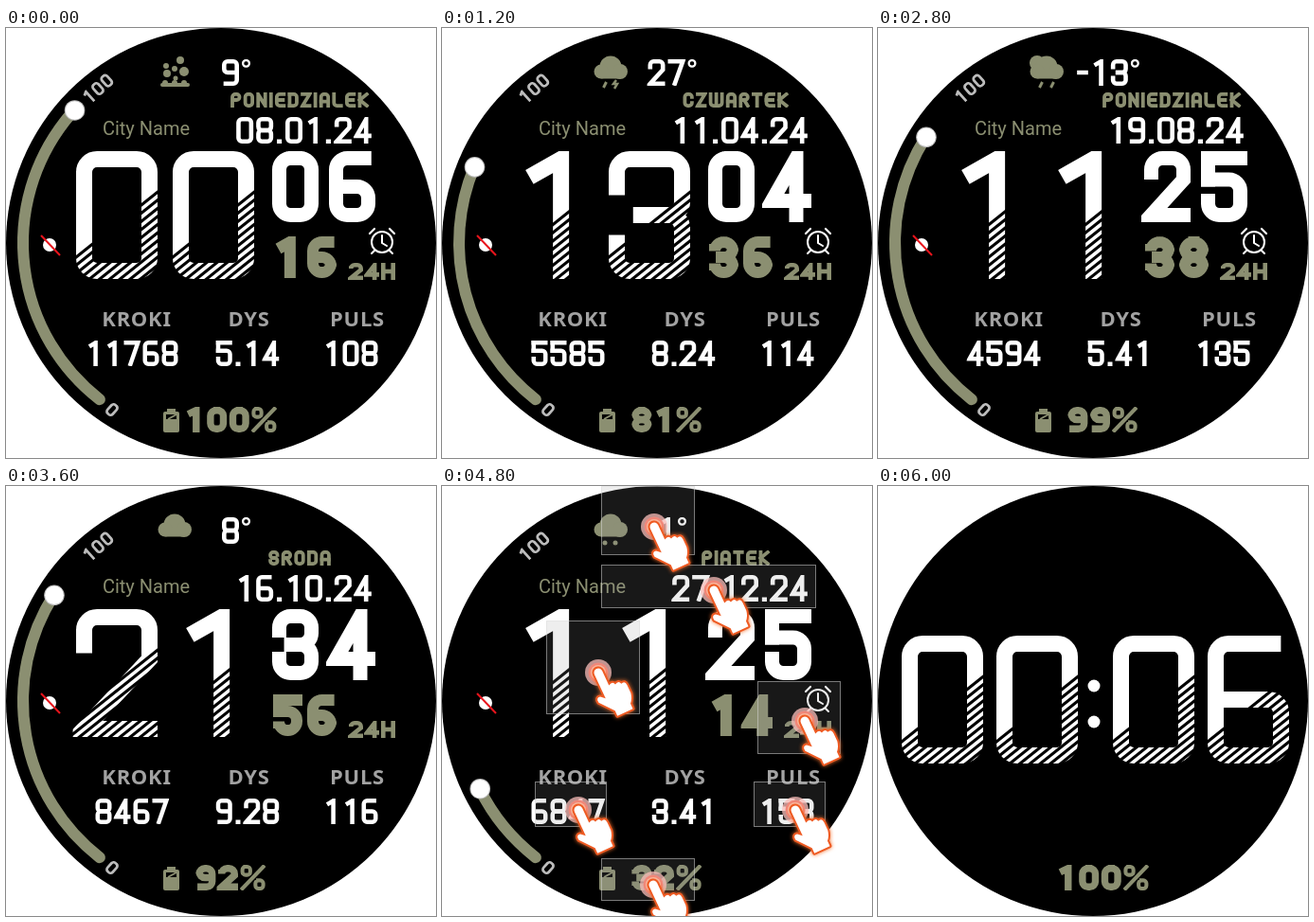
Recreate the animation shown at these times as an HTML page with a canvas. Size 454 by 454 pixels, loop 6400 ms.

```html
<!DOCTYPE html>
<html lang="pl">
<head>
<meta charset="utf-8">
<title>Watch face</title>
<style>
html, body { margin: 0; width: 100%; height: 100%; overflow: hidden; background: #fff; }
canvas { display: block; width: 454px; height: 454px; }
</style>
</head>
<body>
<canvas id="face" width="454" height="454"></canvas>
<script>
const ctx = document.getElementById('face').getContext('2d');
const OLIVE = '#8b8f71', WHITE = '#fff', GREY = '#a2a2a2';
const rad = deg => deg * Math.PI / 180;

// One month per row
const FIELDS = 'hour min sec date day temp sky steps dist pulse power alarm'.split(' ');
const MONTHS = `
00 06 16 08.01 PONIEDZIALEK 9 dust 11768 5.14 108 100 1
07 14 27 13.02 WTOREK 12 rain 8326 6.25 112 72 1
19 52 45 20.03 SRODA 18 cloud 7410 4.86 126 65 0
13 04 36 11.04 CZWARTEK 27 storm 5585 8.24 114 81 1
18 47 21 24.05 PIATEK 23 rain 10342 7.52 121 76 0
00 34 14 22.06 SOBOTA -11 moon 9725 9.41 137 24 1
09 58 52 14.07 NIEDZIELA 25 storm 6238 3.95 118 63 0
11 25 38 19.08 PONIEDZIALEK -13 shower 4594 5.41 135 99 1
16 43 20 17.09 WTOREK 16 rain 7851 6.73 124 95 1
21 34 56 16.10 SRODA 8 cloud 8467 9.28 116 92 0
04 11 07 21.11 CZWARTEK -2 snow 12982 12.33 113 33 0
11 25 14 27.12 PIATEK 1 hail 6847 3.41 153 32 1
`.trim().split('\n').map(row =>
  Object.fromEntries(row.split(' ').map((v, i) => [FIELDS[i], v])));

// Stroke typeface on an 8 x 8 grid: "xy" points, commas part the strokes
const GLYPHS = {
  0: '40 80 88 08 00 40',
  1: '21 50 58',
  2: '02 00 80 83 08 88',
  3: '02 00 80 84 34,34 84 88 08 06',
  4: '68 60 06 86',
  5: '80 00,00 03,03 83 88 08 06',
  6: '70 00 08 88 84 04',
  7: '00 80 38',
  8: '40 80 84 04 00 40,44 84 88 08 04 44',
  9: '18 88 80 00 04 84',
  '.': '38 58', '-': '04 84',
  '°': '40 80 82 02 00 40',
  '%': '10 30 33 03 00 10,80 08,65 85 88 58 55 65',
  A: '08 00 80 88,05 85', B: '40 80 84 04 00 40,44 84 88 08 04 44',
  C: '82 80 00 08 88 86', D: '00 80 88 08,00 08', E: '80 00 08 88,04 74',
  H: '00 08,80 88,04 84', I: '40 48', K: '00 08,80 04 88', L: '00 08 88',
  N: '08 00 88 80', O: '40 80 88 08 00 40', P: '08 00 80 84 04',
  R: '08 00 80 84 04,44 88', S: '82 80 00 04 84 88 08 06',
  T: '00 80,40 48', W: '00 08 88 80,40 48', Z: '00 80 08 88'
};
const WIDTH = { '.': .38, '-': .65, '°': .5, '%': 1.24, I: .33, W: 1.4 };
const WEIGHT = { '%': .55, '°': .5 };

const HOUR = { w: 86, h: 135, t: 17, gap: 16 };
const MINUTE = { w: 49, h: 75, t: 15, gap: 11 };
const SECOND = { w: 31, h: 44, t: 12, gap: 5 };
const DATE = { w: 18, h: 28, t: 4.6, gap: 3 };
const VALUE = { w: 17, h: 27, t: 4.5, gap: 3 };
const POWER = { w: 21, h: 27, t: 7.4, gap: 2.6 };
const DAY = { w: 11.3, h: 16, t: 3.8, gap: 2.3 };
const MODE = { w: 15, h: 18, t: 4.6, gap: 2 };
const SCALE = { w: 10, h: 15, t: 2.8, gap: 2.5 };

const charWidth = (c, font) => font.w * (WIDTH[c] || 1);

function glyph(c, x, y, font, color) {
  const w = charWidth(c, font), t = font.t * (WEIGHT[c] || 1);
  const r = Math.max(3, t * .8), pad = t * .2;
  ctx.save();
  ctx.beginPath();
  ctx.rect(x - pad, y, w + 2 * pad, font.h);
  ctx.clip();
  ctx.strokeStyle = color;
  ctx.lineWidth = t;
  ctx.lineCap = 'square';
  ctx.lineJoin = 'miter';
  for (const stroke of GLYPHS[c].split(',')) {
    const p = stroke.split(' ').map(([gx, gy]) =>
      [x + t / 2 + gx / 8 * (w - t), y + t / 2 + gy / 8 * (font.h - t)]);
    ctx.beginPath();
    ctx.moveTo(...p[0]);
    for (let i = 1; i < p.length; i++) {
      const [a, b, n] = [p[i - 1], p[i], p[i + 1]];
      const square = n && Math.abs((b[0] - a[0]) * (n[0] - b[0]) + (b[1] - a[1]) * (n[1] - b[1])) < .01;
      if (square) ctx.arcTo(...b, ...n, r);
      else ctx.lineTo(...b);
    }
    ctx.stroke();
  }
  ctx.restore();
}

function write(str, x, y, font, color) {
  for (const c of str) {
    glyph(c, x, y, font, color);
    x += charWidth(c, font) + font.gap;
  }
}

function writeMid(str, mid, y, font, color) {
  const total = [...str].reduce((sum, c) => sum + charWidth(c, font) + font.gap, -font.gap);
  write(str, mid - total / 2, y, font, color);
}

// Large digit whose lower right part is hatched
function hatched(c, x, y) {
  glyph(c, x, y, HOUR, WHITE);
  ctx.save();
  ctx.beginPath();
  ctx.rect(x - 5, y, HOUR.w + 10, HOUR.h + 1);
  ctx.clip();
  for (let d = 112; d < 220; d += 8.6)
    line('#000', 3.1, [x - 10, y + d + 8], [x + 96, y + d - 76.8]);
  ctx.restore();
}

function line(color, width, ...pts) {
  ctx.strokeStyle = color;
  ctx.lineWidth = width;
  ctx.beginPath();
  pts.forEach(p => ctx.lineTo(...p));
  ctx.stroke();
}

function disc(x, y, r, color = OLIVE) {
  ctx.fillStyle = color;
  ctx.beginPath();
  ctx.arc(x, y, r, 0, 7);
  ctx.fill();
}

function box(x, y, w, h, color, r = 0) {
  ctx.fillStyle = color;
  ctx.beginPath();
  ctx.roundRect(x, y, w, h, r);
  ctx.fill();
}

function label(str, x, y, color, font, spacing = '0px') {
  ctx.font = font;
  ctx.letterSpacing = spacing;
  ctx.textAlign = 'center';
  ctx.fillStyle = color;
  ctx.fillText(str, x, y);
}

function cloud() {
  disc(178, 41, 11.5);
  disc(168, 46, 7.5);
  disc(188, 46, 8);
  box(166, 44, 24, 9.5, OLIVE, 3);
}

function crescent(x, y, r) {
  disc(x, y, r);
  disc(x + r * .55, y - r * .4, r * .88, '#000');
}

function drops(...xs) {
  xs.forEach(x => line(OLIVE, 3, [x + 1.5, 57], [x - 1.5, 63]));
}

const SKY = {
  dust() {
    [[184, 34, 4], [169, 40, 3], [178, 43, 3], [188, 46, 5], [170, 48, 4], [179, 53, 2.5]]
      .forEach(d => disc(...d));
    box(163, 58, 31, 4, OLIVE, 2);
    [168, 178, 188].forEach(x => disc(x, 58, 3));
  },
  cloud,
  rain() { cloud(); drops(170, 178, 186); },
  storm() {
    cloud();
    drops(172);
    line(OLIVE, 2.5, [184, 55], [181, 59], [185, 59], [182, 64]);
  },
  moon() { crescent(176, 47, 14.5); },
  shower() {
    disc(168, 37, 8);
    disc(180, 42, 12.5, '#000');
    cloud();
    drops(172, 184);
  },
  snow() {
    cloud();
    for (let a = 0; a < 180; a += 60) {
      const dx = 4.5 * Math.sin(rad(a)), dy = 4.5 * Math.cos(rad(a));
      line(OLIVE, 2, [178 - dx, 61 - dy], [178 + dx, 61 + dy]);
    }
  },
  hail() { cloud(); disc(172, 60, 2.5); disc(183, 60, 2.5); }
};

function gauge(power) {
  const at = -55.8 + 9.8 * Math.floor(power / 10);
  ctx.strokeStyle = OLIVE;
  ctx.lineWidth = 12;
  ctx.lineCap = 'round';
  ctx.beginPath();
  ctx.arc(227, 227, 209, rad(180 - 52.2), rad(180 + at));
  ctx.stroke();
  ctx.lineCap = 'butt';
  const x = 227 - 208.5 * Math.cos(rad(at)), y = 227 - 208.5 * Math.sin(rad(at));
  disc(x, y, 10.8, '#bbb');
  disc(x, y, 9.8, WHITE);
  tilted('100', 97, 64, -42);
  tilted('0', 112, 403, 42);
}

function tilted(str, x, y, deg) {
  ctx.save();
  ctx.translate(x, y);
  ctx.rotate(rad(deg));
  writeMid(str, 0, -SCALE.h / 2, SCALE, '#bcbcbc');
  ctx.restore();
}

function alarm() {
  ctx.strokeStyle = WHITE;
  ctx.lineWidth = 2;
  ctx.beginPath();
  ctx.arc(397, 226, 11, 0, 7);
  ctx.stroke();
  ctx.lineCap = 'round';
  line(WHITE, 2, [397, 219], [397, 227], [402, 230]);
  for (const s of [-1, 1]) {
    line(WHITE, 2.2, [397 + s * 8, 212], [397 + s * 13, 217]);
    line(WHITE, 2, [397 + s * 8, 235], [397 + s * 11, 238]);
  }
  ctx.lineCap = 'butt';
}

function battery() {
  box(170, 402, 9, 4, OLIVE);
  box(166, 405, 17, 22, OLIVE, 2);
  box(169, 408, 11, 5, '#000');
  line(OLIVE, 2, [171, 413], [180, 408]);
}

function watch(m) {
  hatched(m.hour[0], 74, 130);
  hatched(m.hour[1], 176, 130);
  gauge(+m.power);
  SKY[m.sky]();
  writeMid(m.temp + '°', 243, 33, DATE, WHITE);
  writeMid(m.day, 310, 68, DAY, OLIVE);
  writeMid(m.date + '.24', 314.5, 94, DATE, WHITE);
  label('City Name', 148, 113, OLIVE, '20px Roboto, sans-serif');
  write(m.min, 281, 130, MINUTE, WHITE);
  write(m.sec, 282, 220, SECOND, OLIVE);
  write('24H', 362, 248, MODE, OLIVE);
  if (m.alarm === '1') alarm();
  disc(46, 229, 7, WHITE);
  line('#e8141c', 2, [37, 219], [57, 240]);
  [['KROKI', 138, m.steps, 133], ['DYS', 256.5, m.dist, 255], ['PULS', 371, m.pulse, 364]]
    .forEach(([name, x, value, mid]) => {
      label(name, x, 315, GREY, '700 22px "Noto Sans", sans-serif', '0.7px');
      writeMid(value, mid, 330, VALUE, WHITE);
    });
  battery();
  writeMid(m.power + '%', 237, 400, POWER, OLIVE);
}

function ambient(time, power) {
  [25, 125, 248, 348].forEach((x, i) => hatched(time[i], x, 158));
  disc(228, 211, 6.5, WHITE);
  disc(228, 249, 6.5, WHITE);
  writeMid(power + '%', 237, 400, POWER, OLIVE);
}

// Tap zone: x, y, width, height, then the fingertip
const ZONES = [
  [168, 0, 99, 73, 224, 43], [168, 83, 227, 46, 287, 110], [110, 142, 99, 99, 165, 197],
  [333, 206, 88, 77, 383, 248], [98, 312, 76, 48, 144, 342], [329, 312, 76, 48, 373, 342],
  [168, 393, 99, 45, 223, 421]
];
const HAND = new Path2D('M-4.5 0A4.5 4.5 0 0 1 4.5 0V17Q10 14 11 19Q16 16 17 21Q22 19 22 25V34Q21 40 17 44V50H-1V44L-13 29Q-14 23 -9 24L-4.5 28Z');

function zone([x, y, w, h]) {
  box(x, y, w, h, 'rgba(150,150,150,.16)');
  ctx.strokeStyle = '#ddd';
  ctx.lineWidth = 1;
  ctx.setLineDash([1, 1]);
  ctx.strokeRect(x + .5, y + .5, w - 1, h - 1);
  ctx.setLineDash([]);
}

function tap(x, y) {
  disc(x, y, 14, 'rgba(250,190,185,.75)');
  disc(x, y, 10.5, '#f08a80');
  disc(x, y, 8, '#fbd0c8');
  ctx.save();
  ctx.translate(x, y);
  ctx.rotate(rad(-25));
  ctx.lineJoin = 'round';
  ctx.shadowColor = '#f4702c';
  ctx.shadowBlur = 4;
  ctx.strokeStyle = '#ee5a22';
  ctx.lineWidth = 4;
  ctx.stroke(HAND);
  ctx.shadowBlur = 0;
  ctx.fillStyle = WHITE;
  ctx.fill(HAND);
  ctx.restore();
}

function draw() {
  const t = performance.now() % 6400;
  ctx.fillStyle = WHITE;
  ctx.fillRect(0, 0, 454, 454);
  disc(227, 227, 227, '#000');
  if (t < 5600) {
    watch(MONTHS[Math.min(11, Math.floor(t / 400))]);
    if (t >= 4800) {
      ZONES.forEach(zone);
      ZONES.forEach(z => tap(z[4], z[5]));
    }
  } else if (t < 6000) ambient('1125', 32);
  else ambient('0006', 100);
  requestAnimationFrame(draw);
}
draw();
</script>
</body>
</html>
```
